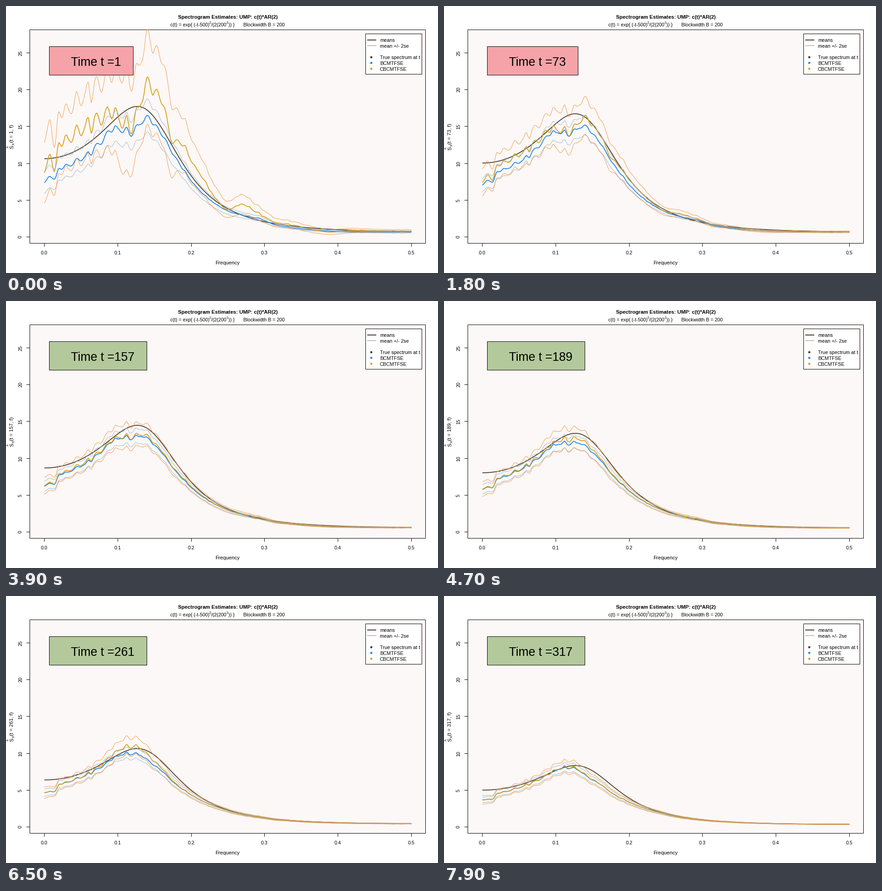
Recreate the animation shown at these times as a matplotlib script. Size 952 by 589 pixels, loop 8 s.

```python
import numpy as np
import matplotlib
import matplotlib.pyplot as plt
from matplotlib.animation import FuncAnimation
from matplotlib.patches import Rectangle, Circle

matplotlib.rcParams["font.family"] = "Liberation Sans"
matplotlib.rcParams["path.simplify"] = False
W, H, DPI = 952, 589, 64
PT = 72 / DPI  # points per pixel

DARK, BLUE, GOLD = "#4a3b2c", "#1c86ee", "#d8a018"
PALE, ORANGE = "#94b3cb", "#f0923c"
PINK, GREEN = "#f5a3a8", "#b3c99c"

freq = np.linspace(0, 0.5, 501)
rng = np.random.default_rng(4)


# ---- spectra -------------------------------------------------------------
def bump(x, mid, width):
    return np.exp(-((x - mid) / width) ** 2 / 2)


def profile(points):
    """Softened curve through (thousandths of a cycle, value) points."""
    knots, values = zip(*points)
    y = np.interp(freq * 1000, knots, values)
    kernel = np.hanning(7)
    return np.convolve(np.pad(y, 3, mode="edge"), kernel / kernel.sum(), "valid")


# AR(2) spectrum with unit maximum, scaled by a slowly falling peak
w = 2 * np.pi * freq
shape = 0.216 / (1.8 - 2.24 * np.cos(w) + 0.8 * np.cos(2 * w))
peak = np.poly1d(np.polyfit([1, 101, 221, 317], [17.73, 16.1, 12.22, 8.34], 3))

# BCMTFSE relative to the truth, at the start and at the end
blue_start = profile([(0, .69), (6, .77), (14, .72), (19, .86), (60, .88),
                      (91, .95), (119, .8), (143, .95), (200, .92), (250, .91),
                      (295, 1.13), (316, .9), (390, .74), (500, .88)])
blue_end = profile([(0, .74), (14, .74), (20, .9), (60, .95), (105, 1.01),
                    (126, .96), (142, .85), (183, .82), (242, .97), (500, .95)])

# early excess of CBCMTFSE over BCMTFSE
excess = profile([(0, .18), (8, .38), (13.5, .08), (18, .38), (60, .36),
                  (105, .08), (119, .06), (140, .28), (162, .33), (173, .12),
                  (188, .36), (216, .37), (248, 0), (271, .55), (297, .2),
                  (345, .3), (387, -.2), (420, .25), (500, .07)])
late_excess = 0.12 * bump(freq, 0.122, 0.028)

# regular ripple of the tapers, plus a little roughness
ripple = np.cos(2 * np.pi * (freq - 0.0575) / 0.0137)
ripple *= np.interp(freq, [0.016, 0.026, 0.11, 0.2, 0.5], [0, 1, 1, 0.25, 0.25])
knots = np.linspace(0, 0.5, 126)
grain = np.interp(freq, knots, rng.normal(0, 0.009, knots.size))

blue_spread = 1 + 0.5 * np.exp(-freq / 0.03)
gold_early = 0.19 * (1 + 0.6 * bump(freq, 0, 0.01) + 0.8 * bump(freq, 0.112, 0.009)
                     + 0.4 * bump(freq, 0.172, 0.006) + bump(freq, 0.387, 0.02))
gold_late = 0.105 * (1 + 0.6 * np.exp(-freq / 0.015))


def estimates(t):
    """True spectrum, then (mean, relative half-width) of both estimates."""
    early = np.exp(-(t - 1) / 55)
    late = bump(t, 240, 35)
    true = peak(t) * shape
    mix = (t - 1) / 316
    blue = true * ((1 - mix) * blue_start + mix * blue_end)
    gold = blue * (1 + early * excess + late * late_excess)
    blue = blue * (1 + (0.012 + 0.016 * early) * ripple + grain)
    gold = gold * (1 + (0.018 + 0.04 * early) * ripple + (1 + early) * grain)
    return (true, (blue, (0.07 + 0.065 * early) * blue_spread),
            (gold, gold_late + early * gold_early))


# ---- stage ---------------------------------------------------------------
fig = plt.figure(figsize=(W / DPI, H / DPI), dpi=DPI, facecolor="white")
ax = fig.add_axes([0, 0, 1, 1])
ax.set_xlim(0, W)
ax.set_ylim(H, 0)
ax.axis("off")


def px(f):
    return 84.5 + 1618 * f


def py(v):
    return 509.5 - 16.24 * v


def text(x, y, s, size, **kw):
    kw.setdefault("va", "baseline")
    return ax.text(x, y, s, fontsize=size * PT, color="black", zorder=8, **kw)


def upright(s, size, **kw):
    return text(0, 0, s, size, rotation=90, rotation_mode="anchor", **kw)


def box(x0, y0, x1, y1, fill, z):
    return ax.add_patch(Rectangle((x0, y0), x1 - x0, y1 - y0, facecolor=fill,
                                  edgecolor="black", lw=PT, zorder=z, snap=False))


def line(x, y, color, width=1, z=3):
    return ax.plot(x, y, color=color, lw=width * PT, zorder=z, snap=False,
                   solid_capstyle="butt")[0]


box(52.5, 52.5, 924.5, 523.5, "#fcf8f7", 1)

for i in range(6):
    x, y = np.floor(px(i / 10)) + 0.5, np.floor(py(5 * i)) + 0.5
    line([x, x], [524, 531], "black")
    line([45, 52], [y, y], "black")
    text(x - 0.5, 548, f"{i / 10:.1f}", 10.8, ha="center")
    text(37, y, str(5 * i), 10.8, ha="right", va="center", rotation=90)

text(489, 28, "Spectrogram Estimates: UMP: c(t)*AR(2)", 11.4, ha="center",
     weight="bold")
for x, s in [(362, "c(t) = exp{ (-t-500)"), (451.5, "/(2(200"),
             (489.5, ")) }"), (523, "Blockwidth B = 200")]:
    text(x, 45, s, 10.67)
for x in (447.5, 485.5):
    text(x, 39, "2", 7.5)
text(488, 570, "Frequency", 11.4, ha="center")

box(792.5, 61.5, 916.5, 150.5, "white", 6)
line([796, 816], [75, 75], DARK, 2, 7)
line([796, 816], [87.5, 87.5], "#94857b", 1, 7)
for y, s in [(79, "means"), (92, "mean +/- 2se"), (117, "True spectrum at t"),
             (130, "BCMTFSE"), (143, "CBCMTFSE")]:
    text(824, y, s, 10.85)
for y, c in [(113, DARK), (125.5, BLUE), (138.5, GOLD)]:
    ax.add_patch(Circle((805, y), 2.4, color=c, lw=0, zorder=7))

# ---- moving parts --------------------------------------------------------
xs = px(freq)
true_line = line(xs, xs, DARK, 1.8, 2)


def estimate_lines(mean_color, band_color, z):
    return [line(xs, xs, mean_color, 1.8, z)] + [
        line(xs, xs, band_color, 0.9, z + 0.5) for _ in range(2)]


blue_lines = estimate_lines(BLUE, PALE, 3)
gold_lines = estimate_lines(GOLD, ORANGE, 3.2)

tag = box(95.5, 89.5, 280.5, 152.5, PINK, 6)
tag_text = text(143, 132, "", 26.67)

label_s = upright("S", 11.4)
label_hat = upright("^", 10, ha="center")
label_x = upright("X", 8.2)
label_t = upright("", 11.4)


def update(i):
    t = 1 + 4 * i
    digits = len(str(t))
    true, *both = estimates(t)
    true_line.set_ydata(py(true))
    for lines, (mean, err) in zip((blue_lines, gold_lines), both):
        for part, k in zip(lines, (0, 1, -1)):
            part.set_ydata(py(mean * (1 + k * err)))

    tag.set_width(170 + 15 * digits)
    tag.set_facecolor(PINK if t < 100 else GREEN)
    tag_text.set_text(f"Time t ={t}")

    base = 288.5 + (46 + 6.3 * digits) / 2
    label_s.set_position((16, base))
    label_hat.set_position((10, base - 3.8))
    label_x.set_position((18.5, base - 7.6))
    label_t.set_position((16, base - 13.2))
    label_t.set_text(f"(t = {t}, f)")
    return []


anim = FuncAnimation(fig, update, frames=80, interval=100, repeat=True)
plt.show()
```
